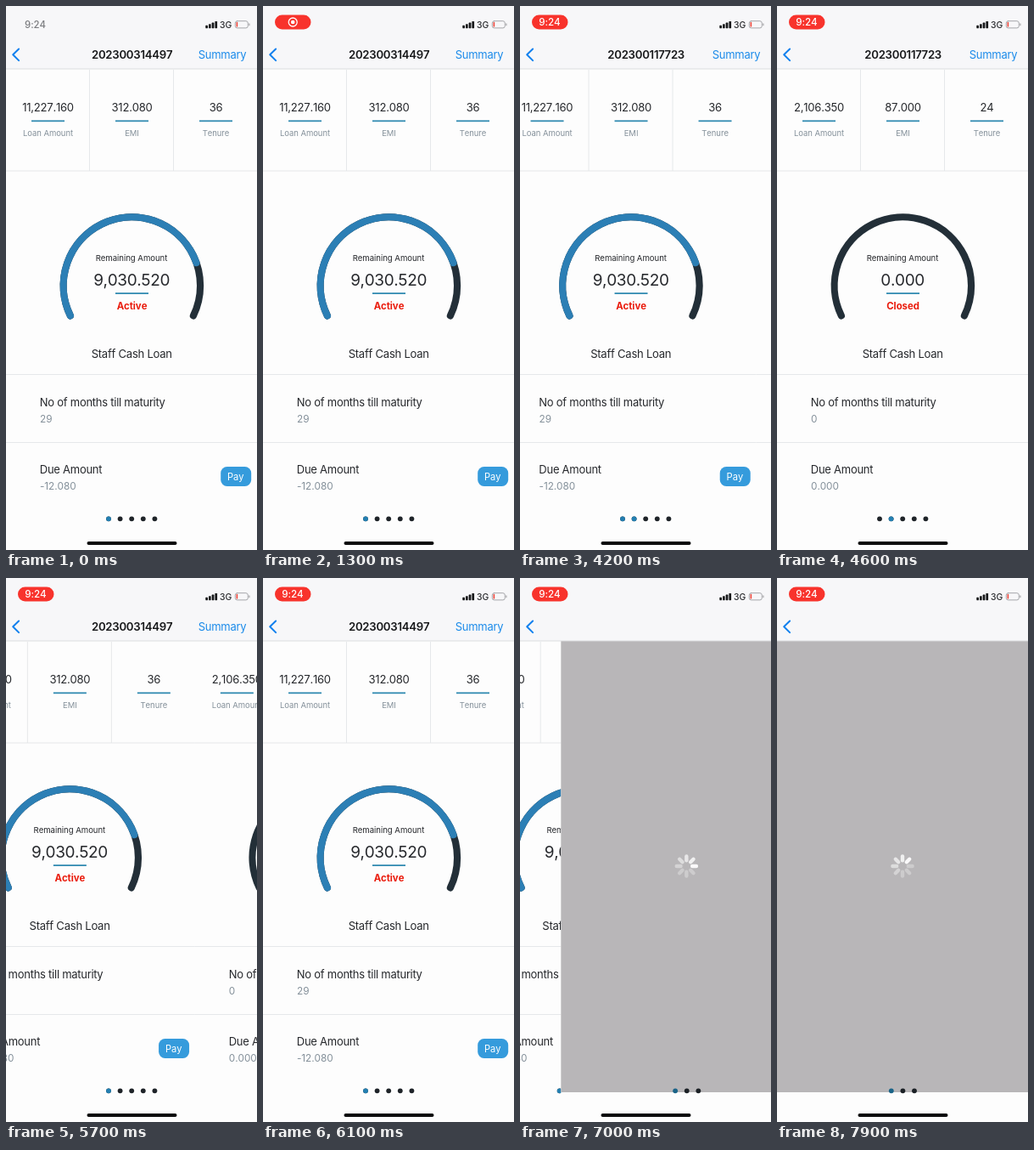
Recreate the animation shown at these times as an HTML page with a canvas. Size 296 by 640 pixels, loop 8000 ms.

```html
<!DOCTYPE html>
<html lang="en">
<head>
<meta charset="utf-8">
<title>Loan details</title>
<style>
html, body { margin: 0; width: 100%; height: 100%; overflow: hidden; background: #fdfdfd; }
canvas { display: block; width: 296px; height: 640px; }
</style>
</head>
<body>
<canvas id="stage"></canvas>
<script>
const W = 296, H = 640, LOOP = 8000, NAV = 74, BAR = 605;
const BLUE = '#2c7fb5', DARK = '#232f38', GREY = '#84909a', INK = '#26282c', LINE = '#e6e8ea';
const TINT = '#1c8bea', RULE = '#338cb2';
const canvas = document.getElementById('stage');
const ctx = canvas.getContext('2d');
const ratio = window.devicePixelRatio || 1;
canvas.width = W * ratio;
canvas.height = H * ratio;

const loans = [
  { id: '202300314497', amount: '11,227.160', emi: '312.080', tenure: '36', left: '9,030.520',
    state: 'Active', months: '29', due: '-12.080', share: 0.804, pay: true },
  { id: '202300117723', amount: '2,106.350', emi: '87.000', tenure: '24', left: '0.000',
    state: 'Closed', months: '0', due: '0.000', share: 0, pay: false }
];

const clamp = v => Math.max(0, Math.min(1, v));
const ramp = (t, a, b) => clamp((t - a) / (b - a));
const easeOut = u => 1 - Math.pow(1 - u, 3);
const spring = s => s <= 0 ? 0 : 1 - (1 + 14 * s) * Math.exp(-14 * s);

function rect(x, y, w, h, color) {
  ctx.fillStyle = color;
  ctx.fillRect(x, y, w, h);
}

function pill(x, y, w, h, r, color) {
  ctx.fillStyle = color;
  ctx.beginPath();
  ctx.roundRect(x, y, w, h, r);
  ctx.fill();
}

function disc(x, y, r, color) {
  ctx.fillStyle = color;
  ctx.beginPath();
  ctx.arc(x, y, r, 0, 7);
  ctx.fill();
}

function text(str, x, y, size, color, align = 'center', weight = 400) {
  ctx.font = `${weight} ${size}px Inter, "Open Sans", sans-serif`;
  ctx.fontKerning = 'none';
  ctx.letterSpacing = (size > 12 ? -0.02 : -0.005) * size + 'px';
  ctx.textAlign = align;
  ctx.textBaseline = 'alphabetic';
  ctx.fillStyle = color;
  ctx.fillText(str, x, y);
}

function arc(from, to, color) {
  const rad = Math.PI / 180;
  ctx.strokeStyle = color;
  ctx.lineWidth = 8.2;
  ctx.lineCap = 'round';
  ctx.beginPath();
  ctx.arc(148.4, 329, 80.7, from * rad, to * rad);
  ctx.stroke();
}

function column(x, value, label) {
  text(value, x, 123.5, 13.1, INK);
  rect(x - 19.5, 134.4, 39, 1.8, RULE);
  text(label, x, 153, 9.5, GREY);
}

function loanPage(loan, x) {
  ctx.save();
  ctx.translate(x, 0);
  column(49.5, loan.amount, 'Loan Amount');
  column(148.5, loan.emi, 'EMI');
  column(247.5, loan.tenure, 'Tenure');
  rect(98, 75, 1, 119, LINE);
  rect(197, 75, 1, 119, LINE);
  for (const y of [193.5, 433, 513]) rect(0, y, W, 1, LINE);

  arc(154, 386, DARK);
  if (loan.share) arc(154, 154 + 232 * loan.share, BLUE);
  text('Remaining Amount', 148, 300, 9.6, INK);
  text(loan.left, 148.1, 328.5, 19, INK);
  rect(129, 337.2, 39, 1.8, RULE);
  text(loan.state, 148.5, 357, 11.4, '#ea1c0d', 'center', 700);
  text('Staff Cash Loan', 148.2, 414.3, 13.1, INK);

  text('No of months till maturity', 39.8, 470.5, 13, INK, 'left');
  text(loan.months, 40, 489.5, 11.8, GREY, 'left');
  text('Due Amount', 39.8, 550.3, 13, INK, 'left');
  text(loan.due, 40, 569, 11.8, GREY, 'left');
  if (loan.pay) {
    pill(253.2, 542, 36, 23, 7.5, '#359bdc');
    text('Pay', 270.8, 557.5, 11.2, '#fff');
  }
  ctx.restore();
}

// Page position between the two loans: 0 is the first, 1 the second.
function pagePos(t) {
  if (t < 4203) return 0.059 * ramp(t, 4100, 4200);
  if (t < 5500) return 0.059 + 0.941 * easeOut(ramp(t, 4203, 4550));
  return 1 - easeOut(ramp(t, 5552, 5952));
}

// The dots follow the selected page, which switches ahead of the scroll.
function pager(t) {
  const selected = ramp(t, 4150, 4250) - ramp(t, 5580, 5680);
  for (let i = 0; i < 5; i++) {
    const x = 121 + i * 13.6;
    disc(x, 603.3, 2.9, '#1f2429');
    ctx.globalAlpha = clamp(2 * (1 - Math.abs(i - selected)));
    disc(x, 603.3, 2.9, '#2480b2');
    ctx.globalAlpha = 1;
  }
}

function spinner(t) {
  const head = Math.floor(t / 125) + 2;
  ctx.lineCap = 'round';
  ctx.lineWidth = 4.4;
  for (let i = 0; i < 8; i++) {
    const age = ((head - i) % 8 + 8) % 8;
    const a = i * Math.PI / 4 - Math.PI / 2;
    ctx.strokeStyle = `rgba(255,255,255,${Math.max(0.3, 0.92 - age * 0.13)})`;
    ctx.beginPath();
    ctx.moveTo(148 + 6.8 * Math.cos(a), 339 + 6.8 * Math.sin(a));
    ctx.lineTo(148 + 11.6 * Math.cos(a), 339 + 11.6 * Math.sin(a));
    ctx.stroke();
  }
}

function summaryPage(t, x) {
  ctx.save();
  ctx.translate(x, 0);
  rect(0, NAV, W, H - NAV, '#fdfdfd');
  rect(0, NAV, W, BAR - NAV, '#b8b6b8');
  for (let i = 0; i < 3; i++) disc(134.8 + i * 13.6, 603.3, 2.9, i ? '#1c2126' : '#1b6488');
  spinner(t);
  ctx.restore();
}

function statusBar(t) {
  const red = ramp(t, 100, 500), swap = ramp(t, 3050, 3300);
  ctx.globalAlpha = 1 - red;
  text('9:24', 34.5, 25.5, 11.4, '#7c7d81', 'center', 500);
  ctx.globalAlpha = red;
  pill(14, 10.5, 42.5, 17, 8.5, '#f8332c');
  ctx.globalAlpha = red * (1 - swap);
  ctx.strokeStyle = '#fff';
  ctx.lineWidth = 1.3;
  ctx.beginPath();
  ctx.arc(35.2, 19, 5, 0, 7);
  ctx.stroke();
  disc(35.2, 19, 2.3, '#fff');
  ctx.globalAlpha = swap;
  text('9:24', 35, 23.2, 11.6, '#fff', 'center', 500);
  ctx.globalAlpha = 1;

  for (let i = 0; i < 4; i++) {
    const h = 3.4 + i * 1.6;
    pill(235.3 + i * 3.7, 26.2 - h, 2.7, h, 0.6, '#17181a');
  }
  text('3G', 259.2, 26, 10.4, '#2c2d30', 'center', 500);
  ctx.strokeStyle = '#a5a6aa';
  ctx.lineWidth = 1;
  ctx.beginPath();
  ctx.roundRect(270.3, 17.7, 15, 8.2, 2.4);
  ctx.stroke();
  pill(286.3, 20.3, 1.2, 3, 0.6, '#a5a6aa');
  pill(271.6, 19, 1.6, 5.6, 0.6, '#ee4338');
}

function navBar(t, push) {
  rect(0, 0, W, NAV, '#f7f7f9');
  rect(0, NAV - 0.5, W, 1, '#dcdde0');
  ctx.strokeStyle = '#1280ee';
  ctx.lineWidth = 2;
  ctx.lineCap = ctx.lineJoin = 'round';
  ctx.beginPath();
  ctx.moveTo(15.1, 50.5);
  ctx.lineTo(8.2, 57.3);
  ctx.lineTo(15.1, 64.1);
  ctx.stroke();
  if (push === 0) {
    const second = t >= 4180 && t < 5620;
    text(loans[+second].id, 148.6, 62, 13.2, '#17181a', 'center', 600);
  }
  ctx.globalAlpha = 1 - ramp(t, 6810, 7000);
  text('Summary', 283.2, 62, 13, TINT, 'right');
  ctx.globalAlpha = 1;
}

function draw(t) {
  const pos = pagePos(t);
  const push = spring((t - 6768) / 1000);
  ctx.setTransform(ratio, 0, 0, ratio, 0, 0);
  rect(0, 0, W, H, '#fdfdfd');
  ctx.save();
  ctx.translate(-push * W * 0.3, 0);
  loans.forEach((loan, i) => {
    if (Math.abs(i - pos) < 1) loanPage(loan, (i - pos) * W);
  });
  pager(t);
  ctx.restore();
  if (push > 0) summaryPage(t, W * (1 - push));
  navBar(t, push);
  statusBar(t);
  pill(95.5, 630, 106, 4, 2, '#0b0b0c');
}

const start = performance.now();
function tick() {
  draw((performance.now() - start) % LOOP);
  requestAnimationFrame(tick);
}
tick();
</script>
</body>
</html>
```
